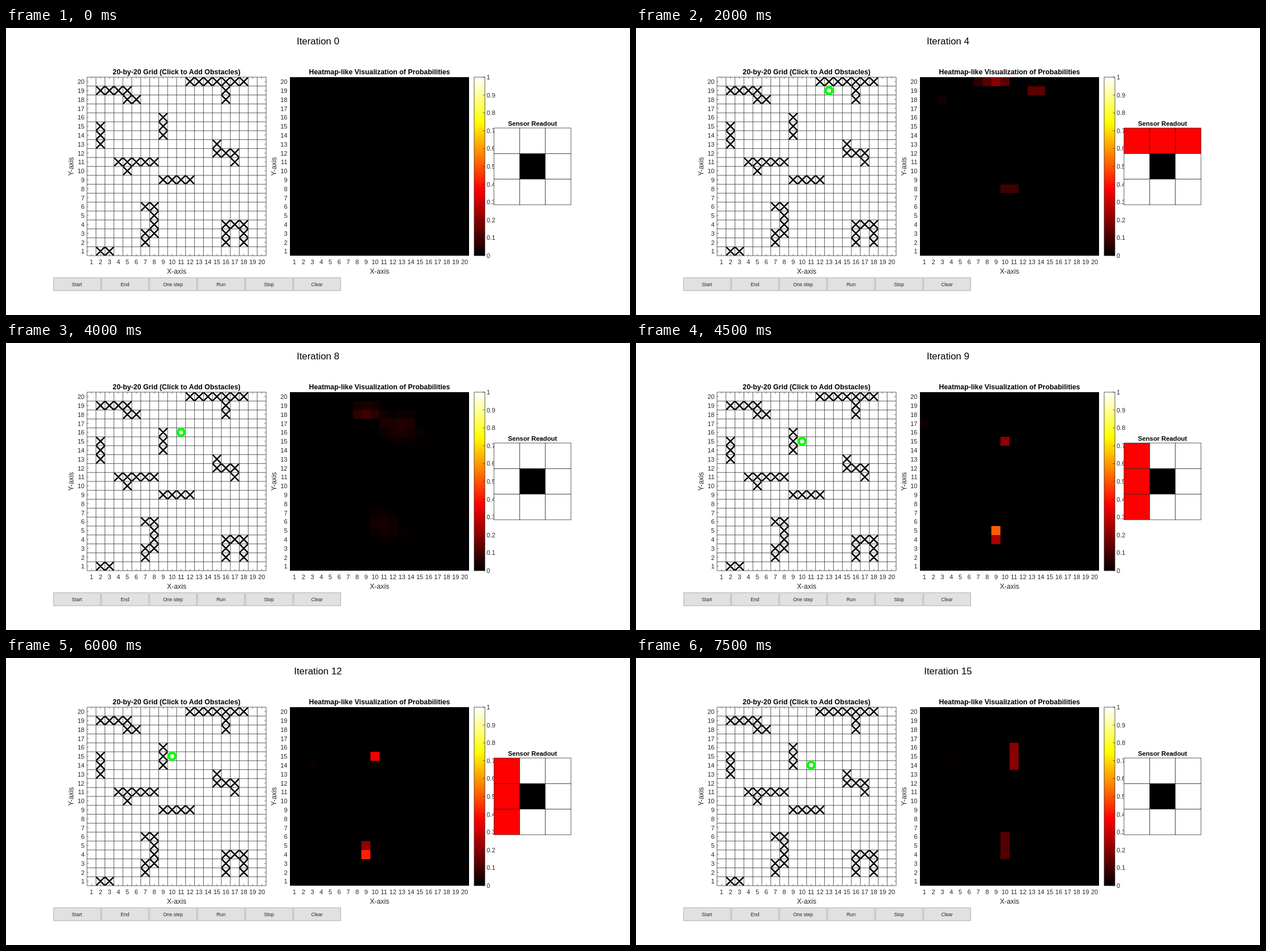
Write an HTML page that moves like this. It is 1101 px wide and 508 px high and loops after 8 s.

```html
<!DOCTYPE html>
<html lang="en">
<head>
<meta charset="utf-8">
<title>Grid localization</title>
<style>
  html, body { margin: 0; width: 100%; height: 100%; overflow: hidden; background: #fff; }
  svg { display: block; width: 100%; height: 100%; font-family: "Liberation Sans", Arial, sans-serif; }
  text { fill: #262626; }
  .bold { font-weight: bold; fill: #000; }
</style>
</head>
<body>
<svg id="stage" viewBox="0 0 1101 508"></svg>
<script>
const stage = document.getElementById('stage');
const N = 20, SIZE = 316, CELL = SIZE / N, TOP = 87, BOTTOM = TOP + SIZE;
const GRID_X = 143, HEAT_X = 501, BAR_X = 826, BAR_W = 19;
const SENSOR_X = 861, SENSOR_Y = 177, SENSOR_CELL = 45.3;
const STEP = 500, STEPS = 16;
const INK = '#262626';

function add(parent, tag, attrs, content) {
  const el = document.createElementNS('http://www.w3.org/2000/svg', tag);
  for (const key in attrs) el.setAttribute(key, attrs[key]);
  if (content !== undefined) el.textContent = content;
  return parent.appendChild(el);
}
function label(content, x, y, size, anchor = 'middle', extra = {}) {
  return add(stage, 'text', { x, y: y + size * 0.36, 'font-size': size, 'text-anchor': anchor, ...extra }, content);
}
function stroke(d, width, color = INK) {
  return add(stage, 'path', { d, fill: 'none', stroke: color, 'stroke-width': width });
}
const colX = (left, col) => left + (col - 0.5) * CELL;
const rowY = row => BOTTOM - (row - 0.5) * CELL;
const key = (col, row) => col + ',' + row;

// Obstacle columns by row
const obstacleRows = {
  20: [12, 13, 14, 15, 16, 17, 18], 19: [2, 3, 4, 5, 16], 18: [5, 6, 16], 16: [9],
  15: [2, 9], 14: [2, 9], 13: [2, 15], 12: [15, 16, 17], 11: [4, 5, 6, 7, 8, 17],
  10: [5], 9: [9, 10, 11, 12], 6: [7, 8], 5: [8], 4: [8, 16, 17, 18],
  3: [7, 8, 16, 18], 2: [7, 16, 18], 1: [2, 3]
};
const obstacles = new Set();
for (const row in obstacleRows) for (const col of obstacleRows[row]) obstacles.add(key(col, row));

const blocked = (col, row) =>
  col < 1 || row < 1 || col > N || row > N || obstacles.has(key(col, row));

// Eight neighbours (and the centre), top-left to bottom-right
function sense(col, row) {
  let bits = '';
  for (let dy = 1; dy >= -1; dy--)
    for (let dx = -1; dx <= 1; dx++) bits += (dx || dy) && blocked(col + dx, row + dy) ? 1 : 0;
  return bits;
}

// Position per iteration; each later move carries a commanded direction
const path = [null, [13, 18], [13, 18], [13, 19], [13, 19], [12, 18], [11, 17], [11, 16],
  [11, 16], [10, 15], [10, 14], [11, 14], [10, 15], [10, 16], [10, 15], [11, 14]];
const moves = '----UDDDDLDRLUDR';
const dirs = { U: [0, 1], D: [0, -1], L: [-1, 0], R: [1, 0] };
const STAY = 3;
const firstBelief = [[7, 20, 1], [8, 20, 2], [9, 20, 3], [10, 20, 2], [13, 19, 2], [14, 19, 2],
  [10, 8, 1.4], [11, 8, 1.4], [3, 18, 0.4]];

function normalise(cells) {
  const total = cells.reduce((sum, c) => sum + c[2], 0);
  return cells.map(([col, row, p]) => [col, row, p / total]);
}
// Robot stays or steps ahead with sideways drift; then keep cells matching the reading
function update(cells, [dx, dy], reading) {
  const next = new Map();
  const put = (col, row, p) => {
    if (blocked(col, row) || sense(col, row) !== reading) return;
    const k = key(col, row), old = next.get(k);
    next.set(k, [col, row, p + (old ? old[2] : 0)]);
  };
  for (const [col, row, p] of cells) {
    put(col, row, p * STAY);
    for (const side of [-1, 0, 1])
      put(col + dx + (dx ? 0 : side), row + dy + (dy ? 0 : side), p);
  }
  return normalise([...next.values()]);
}
const beliefs = [[], [], [], normalise(firstBelief)];
for (let i = 4; i < STEPS; i++)
  beliefs[i] = update(beliefs[i - 1], dirs[moves[i]], sense(...path[i]));

function hot(p) {
  const ch = v => Math.round(255 * Math.min(1, Math.max(0, v)));
  return `rgb(${ch(p * 8 / 3)},${ch(p * 8 / 3 - 1)},${ch(p * 4 - 3)})`;
}

// Obstacle grid
let lines = '', ticks = '', crosses = '';
for (let i = 0; i <= N; i++) {
  const x = GRID_X + i * CELL, y = TOP + i * CELL;
  lines += `M${x} ${TOP}V${BOTTOM}M${GRID_X} ${y}H${GRID_X + SIZE}`;
}
for (let i = 1; i <= N; i++) {
  const x = colX(GRID_X, i), y = rowY(i);
  ticks += `M${x} ${TOP}v3M${x} ${BOTTOM}v-3M${GRID_X} ${y}h3M${GRID_X + SIZE} ${y}h-3`;
}
for (const k of obstacles) {
  const [col, row] = k.split(',').map(Number);
  crosses += `M${colX(GRID_X, col) - 7.3} ${rowY(row) - 7.3}l14.6 14.6m0 -14.6l-14.6 14.6`;
}
stroke(lines, 0.75);
stroke(ticks, 0.6);
stroke(crosses, 2.6, '#000');
const robot = add(stage, 'circle', { r: 5.9, fill: '#fff', stroke: '#0f0', 'stroke-width': 4.6 });

// Heatmap
add(stage, 'rect', { x: HEAT_X, y: TOP, width: SIZE, height: SIZE, fill: '#000' });
const heat = add(stage, 'g', { 'shape-rendering': 'crispEdges' });

for (const left of [GRID_X, HEAT_X]) {
  for (let i = 1; i <= N; i++) {
    label(i, colX(left, i), 414.5, 11);
    label(i, left - 4.5, rowY(i) + 0.3, 11, 'end');
  }
  label('X-axis', left + SIZE / 2, 431, 12.3);
  label('Y-axis', 0, 0, 12.3, 'middle', { transform: `translate(${left - 28} 245) rotate(-90)` });
}
label('20-by-20 Grid (Click to Add Obstacles)', GRID_X + SIZE / 2, 77.3, 12.4, 'middle', { class: 'bold' });
label('Heatmap-like Visualization of Probabilities', HEAT_X + SIZE / 2, 77.3, 12.4, 'middle', { class: 'bold' });
const heading = label('', 550.5, 22.5, 16.9, 'middle', { style: 'fill:#000' });

// Colour bar
const ramp = add(add(stage, 'defs', {}), 'linearGradient', { id: 'ramp', x1: 0, x2: 0, y1: 1, y2: 0 });
for (const p of [0, 0.375, 0.75, 1]) add(ramp, 'stop', { offset: p, 'stop-color': hot(p) });
add(stage, 'rect', { x: BAR_X, y: TOP, width: BAR_W, height: SIZE, fill: 'url(#ramp)', stroke: INK, 'stroke-width': 0.75 });
for (let i = 0; i <= 10; i++) {
  const y = BOTTOM - i * SIZE / 10;
  stroke(`M${BAR_X + BAR_W} ${y}h-3.5`, 0.75);
  label(i / 10, 848, y, 11, 'start');
}

// Sensor readout
label('Sensor Readout', SENSOR_X + SENSOR_CELL * 1.5, 168.5, 11.3, 'middle', { class: 'bold' });
const sensor = [];
for (let i = 0; i < 9; i++)
  sensor.push(add(stage, 'rect', {
    x: SENSOR_X + i % 3 * SENSOR_CELL, y: SENSOR_Y + Math.floor(i / 3) * SENSOR_CELL,
    width: SENSOR_CELL, height: SENSOR_CELL, stroke: INK, 'stroke-width': 0.75
  }));

// Buttons
['Start', 'End', 'One step', 'Run', 'Stop', 'Clear'].forEach((name, i) => {
  const x = 84 + i * 84.7;
  add(stage, 'rect', { x, y: 442, width: 83, height: 23, fill: '#e1e1e1', stroke: '#adadad', 'stroke-width': 1 });
  label(name, x + 41.2, 453.6, 8.6);
});

function show(step) {
  heading.textContent = 'Iteration ' + step;
  const place = path[step];
  robot.setAttribute('visibility', place ? 'visible' : 'hidden');
  if (place) {
    robot.setAttribute('cx', colX(GRID_X, place[0]));
    robot.setAttribute('cy', rowY(place[1]));
  }
  const reading = place ? sense(...place) : '000000000';
  sensor.forEach((cell, i) =>
    cell.setAttribute('fill', i === 4 ? '#000' : reading[i] === '1' ? '#f00' : '#fff'));
  heat.replaceChildren();
  for (const [col, row, p] of beliefs[step])
    add(heat, 'rect', {
      x: HEAT_X + (col - 1) * CELL, y: BOTTOM - row * CELL, width: CELL, height: CELL, fill: hot(p)
    });
}

let shown = 0;
show(0);
const start = performance.now();
function tick() {
  const step = Math.floor((performance.now() - start) / STEP) % STEPS;
  if (step !== shown) show(shown = step);
  requestAnimationFrame(tick);
}
requestAnimationFrame(tick);
</script>
</body>
</html>
```
